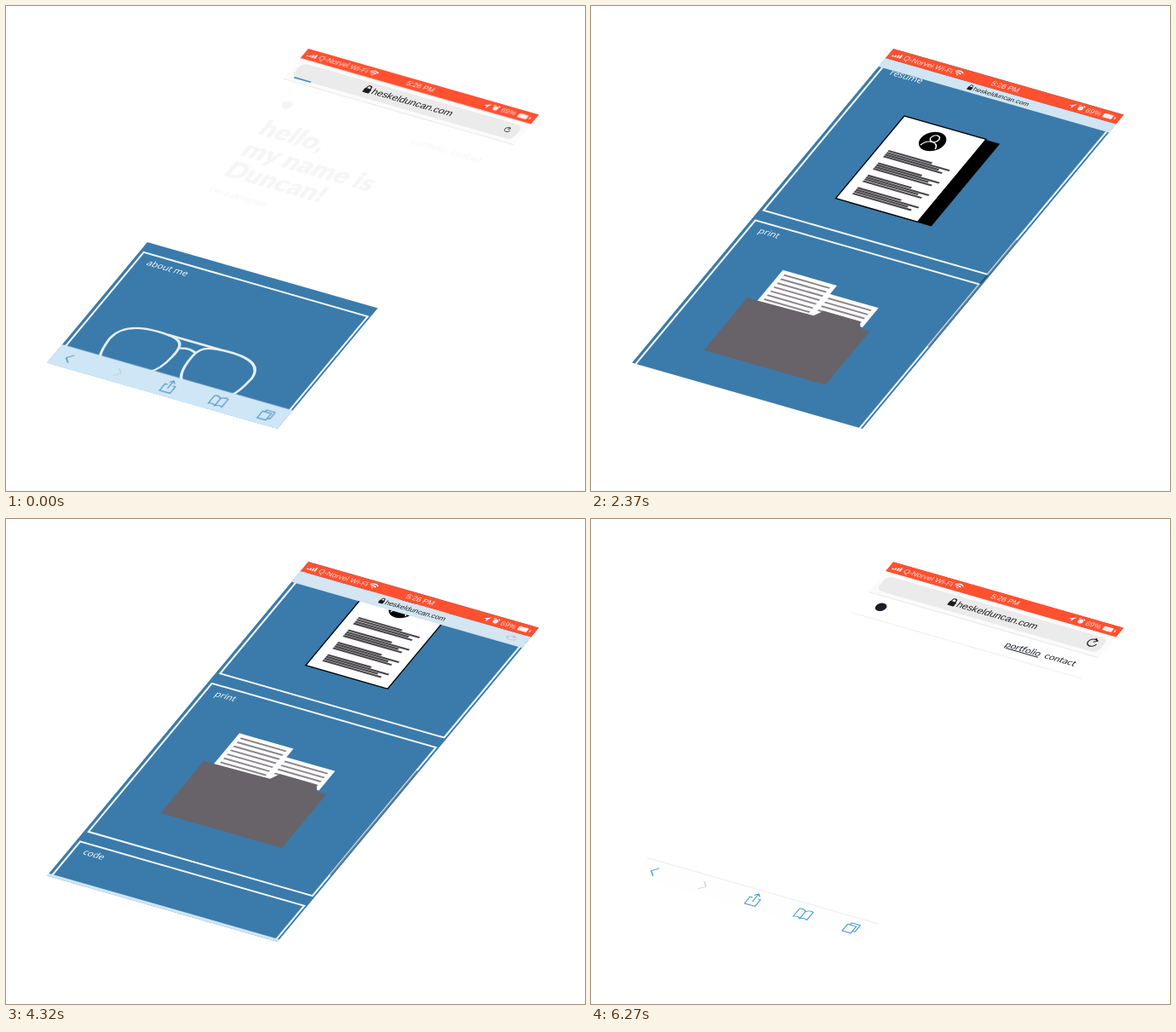
An HTML page that plays this animation: 680 px wide and 569 px high, repeating every 6390 ms.

```html
<!DOCTYPE html>
<html lang="en">
<head>
<meta charset="utf-8">
<title>Phone screen tour</title>
<style>
  html, body { margin: 0; width: 100%; height: 100%; overflow: hidden; background: #fff; }
  svg { display: block; width: 680px; height: 569px; }
  text { font-family: "Liberation Sans", Arial, sans-serif; }
  .site text { font-family: Lato, sans-serif; }
  .site .label { font: 14.6px "Open Sans", "Noto Sans", sans-serif; fill: #fff; }
  .site .code { font: 10.8px "Liberation Sans", Arial, sans-serif; fill: #eee; }
  .hero { font-size: 42px; font-weight: 900; }
</style>
</head>
<body>
<svg viewBox="0 0 680 569">
  <defs>
    <clipPath id="screen"><rect width="375" height="667"/></clipPath>
    <g id="glasses" fill="none" stroke-width="4">
      <path id="lens" d="M112 130C70 130 57 145 56 165C58 200 62 215 100 215C140 214 156 205 158 165C160 138 152 130 112 130Z"/>
      <use href="#lens" transform="translate(342) scale(-1 1)"/>
      <path d="M128 130.500H214M159 148Q171 142 184 148"/>
    </g>
    <path id="folder" d="M80 138L187 136L195 123H254L263 135H278V249H81Z"/>
    <g id="papers"><path d="M97 73H185V91H264V132H250V200H97Z"/></g>
  </defs>
  <g transform="matrix(.7227 .2067 -.4603 .5525 355 50)">
    <g clip-path="url(#screen)">
      <rect width="375" height="667" fill="#fff"/>
      <g id="home" class="site">
        <g id="intro" fill="#1a1e29">
          <circle cx="33.5" cy="-304" r="8"/>
          <g font-size="15"><text x="237" y="-299">portfolio</text><text x="301" y="-299">contact</text></g>
          <g id="greeting">
            <g class="hero">
              <text x="25" y="-223">hello,</text>
              <text x="25" y="-179.5">my name is</text>
              <text x="25" y="-136">Duncan!</text>
            </g>
            <text x="24.500" y="-101.5" font-size="15">I'm a designer.</text>
            <g id="social"></g>
          </g>
        </g>
        <rect width="375" height="1400" fill="#3a7bac"/>
        <g id="sections"></g>
      </g>
      <g id="portfolio" class="site" fill="#1a1e29" font-size="15">
        <circle cx="33.5" cy="84" r="8"/>
        <text x="238" y="91" text-decoration="underline">portfolio</text><text x="302" y="91">contact</text>
        <path d="M0 108H375" stroke="#eee" stroke-width="1.5"/>
      </g>
      <rect id="scrollbar" x="370" width="2.2" rx="1.1" fill="#000" fill-opacity=".4"/>

      <rect id="navBar" y="20" width="375"/>
      <path id="navLine" d="M0 0H375" stroke="#e9e9e9" stroke-width="1.5"/>
      <g id="field">
        <rect x="8" y="27" width="359" height="30" rx="10" fill="#ebebeb"/>
        <rect id="progress" x="13" y="55" height="2.6" fill="#3a8ccb"/>
        <g id="reload" fill="none" stroke="#222" stroke-width="1.7">
          <path d="M4 -5.5A7 7 0 1 0 7 1M0 -9L5 -5.2L0 -1.5"/>
        </g>
      </g>
      <g id="address" fill="#1c1c1e">
        <text x="0" y="5.5" font-size="15.6" text-anchor="middle">heskelduncan.com</text>
        <rect x="-78" y="-2" width="10.5" height="8.5" rx="1.4"/>
        <path d="M-76 -1V-4a3.2 3.2 0 0 1 6.4 0V-1" fill="none" stroke="#1c1c1e" stroke-width="1.7"/>
      </g>

      <rect width="375" height="20" fill="#ff5030"/>
      <g fill="#fff" fill-opacity=".9" font-size="12">
        <path d="M6 14v-2.5h2.6V14zM9.8 14v-4h2.6v4zM13.6 14V8.3h2.6V14zM17.4 14V6.5H20V14z"/>
        <text x="24" y="14.5" fill-opacity=".8">Q-Norvel Wi-Fi</text>
        <path d="M106 8.5Q112.500 3 119 8.500M108.500 11Q112.500 7.500 116.500 11" fill="none" stroke="#fff" stroke-width="1.8"/>
        <path d="M110.500 12.500h4L112.500 14.800z"/>
        <text x="189" y="14.5" text-anchor="middle">5:26 PM</text>
        <path d="M292 10.500L302 5.500L297.500 15L296.500 11z"/>
        <circle cx="311" cy="10.500" r="4"/>
        <path d="M306 7l3-2M316 7l-3-2" stroke="#fff" stroke-width="1.5"/>
        <text x="320" y="14.5" fill-opacity=".8">69%</text>
        <rect x="348" y="6.500" width="15" height="8" rx="1.5"/>
        <rect x="366" y="8.500" width="1.7" height="4"/>
      </g>

      <g id="toolbar">
        <rect id="toolFill" y="628" width="375" height="40"/>
        <path id="toolLine" d="M0 628.500H375" stroke="#eee" stroke-width="1.5"/>
        <g id="tools" fill="none" stroke-width="1.6">
          <path d="M28 641L20 649L28 657"/>
          <path id="forward" d="M101 641L109 649L101 657"/>
          <path d="M182 645H178V659H195V645H191M186.500 652V636M182 640.500L186.500 636L191 640.500"/>
          <path d="M267 643Q261 638 256 641V657Q262 654 267 658Q272 654 278 657V641Q273 638 267 643V658"/>
          <path d="M336 644h14v14h-14zM340 644v-4h14v14h-4"/>
        </g>
      </g>
    </g>
  </g>
</svg>
<script>
const LOOP = 6390, HERO = 411, PITCH = 336;
const el = id => document.getElementById(id);
const set = (id, attrs) => {
  for (const name in attrs) el(id).setAttribute(name, attrs[name]);
};
const range = (n, make) => Array.from({ length: n }, (_, i) => make(i)).join('');
const hLine = (x1, x2, y) => `M${x1} ${y}H${x2}`;

// Smooth monotone interpolation through [time, value] keys
function track(keys, t) {
  const last = keys.length - 1;
  if (t <= keys[0][0]) return keys[0][1];
  if (t >= keys[last][0]) return keys[last][1];
  const i = keys.findIndex(k => k[0] > t) - 1;
  const rate = j => (keys[j + 1][1] - keys[j][1]) / (keys[j + 1][0] - keys[j][0]);
  const slope = j => {
    if (j === 0 || j === last) return 0;
    const a = rate(j - 1), b = rate(j);
    return a * b > 0 ? 2 * a * b / (a + b) : 0;
  };
  const [t0, v0] = keys[i], [t1, v1] = keys[i + 1], h = t1 - t0, p = (t - t0) / h;
  const q = 1 - p;
  return v0 * (1 + 2 * p) * q * q + slope(i) * h * p * q * q
    + v1 * p * p * (3 - 2 * p) - slope(i + 1) * h * p * p * q;
}

const textBlock = w => [198, 229, 214, 222].map((end, i) => hLine(127, end, w + 1.6 + i * 4)).join('');
const paperLines = range(7, i => hLine(104, 178, 81 + i * 8.5)) + range(4, i => hLine(187, 257, 99 + i * 8.5));
const consoleText = ['c:\\Programing Projects', 'c:\\Programing Projects&gt;run Start.exe',
  'Hello World!', 'Welcome to my website!:)', 'Enjoy'];

// pull: how the front slides; lag: how the black layer slides
const sections = [
  {
    title: 'about me',
    shadow: '<use href="#glasses" y="4" stroke="#000"/>',
    art: '<use href="#glasses" stroke="#e6eff6"/>',
    pull: [[1050, 0], [1400, -24], [1700, -24], [2050, 0]], lag: [[0, 0]]
  },
  {
    title: 'résumé',
    shadow: '<rect x="111" y="86" width="133" height="175"/>',
    art: `<rect x="110" y="85" width="133" height="175" fill="#fff" stroke="#000" stroke-width="2"/>
      <circle cx="175" cy="115" r="19"/>
      <g fill="none" stroke="#fff" stroke-width="1.8"><circle cx="175" cy="109" r="6.5"/><path d="M163 127Q165 116 175 116T187 127"/></g>
      <path d="${range(4, i => textBlock(151 + i * 26.2))}" stroke="#4b484d" stroke-width="3.3"/>`,
    pull: [[1950, 0], [2300, -22], [2550, -22], [2950, 0]], lag: [[0, 0]]
  },
  {
    title: 'print',
    shadow: '<use href="#papers"/><use href="#folder"/>',
    art: `<use href="#papers" fill="#fff"/><path d="${paperLines}" stroke="#8b878c" stroke-width="3"/>
      <use href="#folder" fill="#686369"/>`,
    pull: [[0, 0]], lag: [[3000, 0], [3500, -6], [3950, -6], [4250, 0]]
  },
  {
    title: 'code',
    shadow: '<rect x="83" y="92" width="196" height="114"/>',
    art: `<path d="M174 204H188L187 258H174Z" fill="#f2f2f2"/>
      <ellipse cx="178" cy="261" rx="38" ry="12" fill="#f2f2f2"/><path d="M175 204H188V257H177Z" fill="#e4e4e4"/>
      <rect x="83" y="93" width="197" height="112" fill="#a5a3a6"/>
      <rect x="83" y="93" width="197" height="100" fill="#f4f4f4"/>
      <rect x="90" y="100" width="181" height="90" fill="#020204"/>
      ${consoleText.map((s, i) => `<text class="code" x="92" y="${118 + i * 14}">${s}</text>`).join('')}`,
    pull: [[0, 0]], lag: [[3300, 0], [3700, -4], [3950, -4], [4250, 0]]
  }
];

el('sections').innerHTML = sections.map((s, i) => `<g transform="translate(0 ${18 + i * PITCH})">
  <rect x="6.5" y="1" width="364" height="315" fill="none" stroke="#f4f8fb" stroke-width="3"/>
  <text class="label" x="22.500" y="21.500">${s.title}</text>
  <g id="shadow${i}">${s.shadow}</g><g id="art${i}">${s.art}</g></g>`).join('');

el('social').innerHTML = range(4, i => `<circle cx="${47 + i * 52}" cy="-56" r="22.5" fill="#fff" stroke="#333" stroke-width="1.5"/>
  <circle cx="${47 + i * 52}" cy="-56" r="10"/>`);

const scrollKeys = [[780, 0], [1410, 357], [1650, 385], [1950, 402], [2370, 740], [2640, 775], [2790, 775],
  [3000, 795], [3500, 1000], [3840, 1060], [4080, 1068], [4200, 1000], [4680, 234], [5000, 8], [5150, -8], [5280, -3.5], [5400, 0]];
const compactKeys = [[1000, 0], [1300, 1], [4250, 1], [4500, 0]];
const fadeKeys = [[0, .05], [540, 1]];
const socialKeys = [[60, 0], [600, 1]];
const dropKeys = [[0, -16], [600, 0]];
const progressKeys = [[0, 27], [520, 349]];
const reloadKeys = [[0, .6], [600, 1]];
const barKeys = [[760, 0], [900, 1], [5450, 1], [5650, 0]];
const SWITCH = 5820;

const mix = (a, b, k) => `rgb(${a.map((v, i) => Math.round(v + (b[i] - v) * k))})`;

function render(t) {
  const scroll = track(scrollKeys, t), compact = track(compactKeys, t);
  const top = HERO - scroll, navBottom = 64 - 26 * compact, away = t >= SWITCH;

  set('home', { transform: `translate(0 ${top})`, display: away ? 'none' : 'inline' });
  set('portfolio', { display: away ? 'inline' : 'none' });
  set('intro', { opacity: track(fadeKeys, t) });
  set('social', { opacity: track(socialKeys, t) });
  set('greeting', { transform: `translate(0 ${track(dropKeys, t)})` });
  sections.forEach((s, i) => {
    const pull = track(s.pull, t), lag = track(s.lag, t);
    set('art' + i, { transform: `translate(${pull} 0)` });
    set('shadow' + i, { transform: `translate(${lag} 0)`, display: Math.abs(pull - lag) > .2 ? 'inline' : 'none' });
  });

  const view = 667 - navBottom - 40 * (1 - compact);
  set('scrollbar', { y: navBottom + Math.max(0, scroll) * .31, height: view * .36, opacity: away ? 0 : track(barKeys, t) });

  const tint = away ? 0 : Math.min(1, Math.max(0, (navBottom - top) / 20));
  set('navBar', { height: navBottom - 20, fill: mix([251, 251, 251], [209, 229, 243], tint) });
  set('navLine', { transform: `translate(0 ${navBottom})`, opacity: 1 - tint });
  // The field shrinks with the bar so that it never hangs below it
  const squash = 1 - .59 * compact;
  set('field', { opacity: 1 - compact, transform: `translate(0 ${20 * (1 - squash)}) scale(1 ${squash})` });
  set('progress', { width: track(progressKeys, t), opacity: t < 560 ? 1 : 0 });
  set('reload', { transform: `translate(350 41) scale(${track(reloadKeys, t)})` });
  set('address', { transform: `translate(${195.5 - 1.5 * compact} ${41 - 12 * compact}) scale(${1 - .31 * compact})` });

  set('toolbar', { transform: `translate(0 ${42 * compact})` });
  set('toolFill', { fill: away ? '#fefefe' : '#cfe6f7' });
  set('toolLine', { opacity: away ? 1 : 0 });
  set('tools', { stroke: away ? '#3f9bd4' : '#4a90bf' });
  set('forward', { stroke: away ? '#d2d2d2' : '#b5d0e2' });
}

let start;
function tick(now) {
  start ??= now;
  render((now - start) % LOOP);
  requestAnimationFrame(tick);
}
render(0);
requestAnimationFrame(tick);
</script>
</body>
</html>
```
